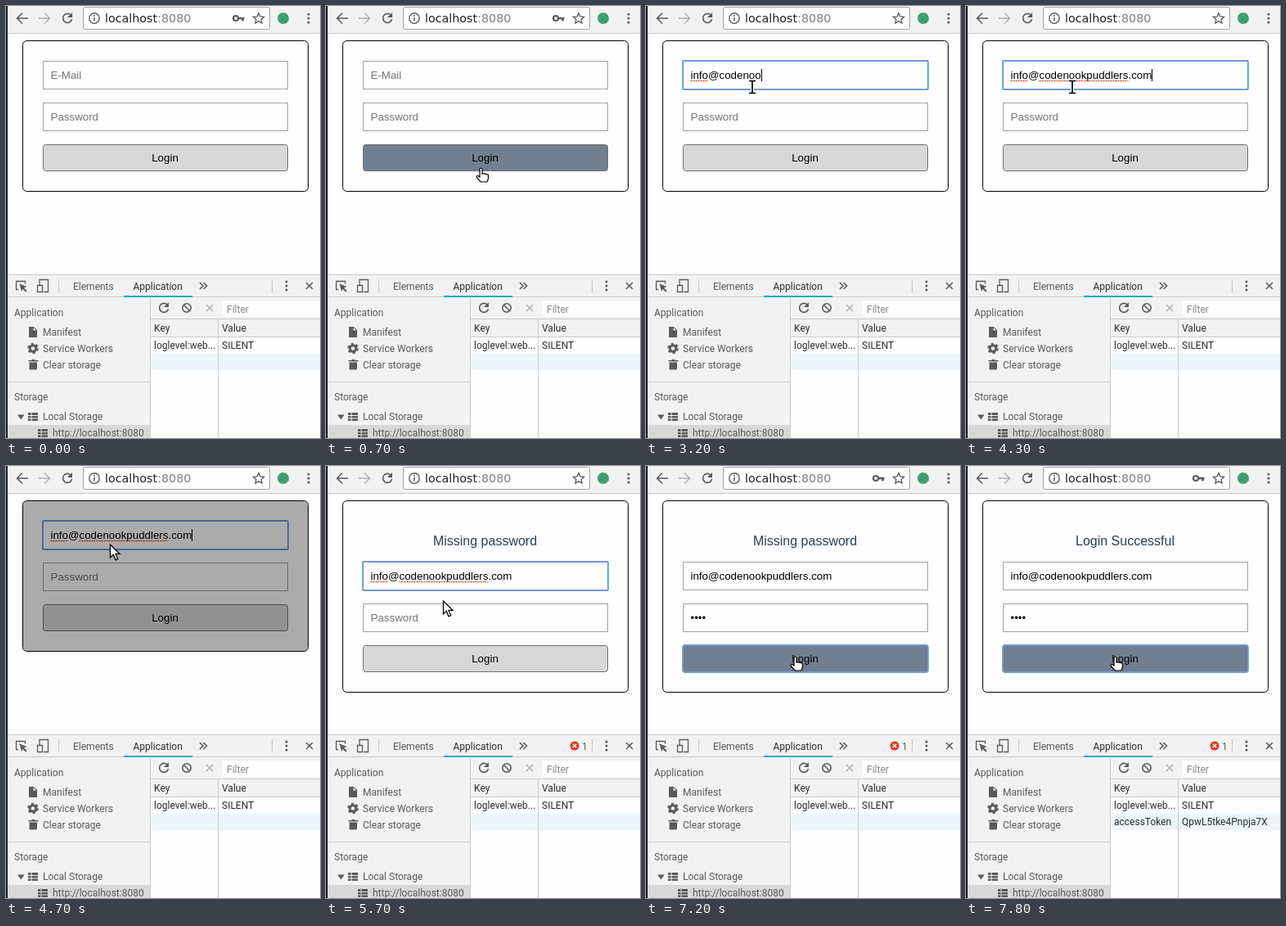
Recreate the animation shown at these times as an HTML page. Size 384 by 528 pixels, loop 8000 ms.

```html
<!DOCTYPE html>
<html lang="en">
<head>
<meta charset="utf-8">
<title>Login form demo</title>
<style>
html, body { margin: 0; width: 100%; height: 100%; overflow: hidden; background: #fefefe; }
svg { display: block; }
text { white-space: pre; font: 12px Roboto, sans-serif; fill: #585858; }
.form text { font: 13.333px "Liberation Sans", Arial, sans-serif; fill: #000; }
.form .hint { fill: #757575; }
.form #message { font-size: 16px; fill: #2c3e50; }
.mid { text-anchor: middle; }
.url { font: 14.3px "DejaVu Sans", sans-serif; fill: #222; }
.dark { fill: #2c2c2c; }
.line { fill: none; stroke: #5a5a5a; stroke-width: 1.6; }
.pale { stroke: #b4b4b4; }
.rule { fill: none; stroke: #cacaca; }
.solid { fill: #5a5a5a; }
.bar { fill: #f2f2f2; }
.field { fill: #fefefe; stroke: #a2a2a6; }
.squiggle { stroke: #cf5a32; stroke-width: 1.4; stroke-dasharray: 2 1; }
</style>
</head>
<body>
<svg width="384" height="528" viewBox="0 0 384 528">
  <defs>
    <g id="table" class="solid">
      <path d="M-6-5h3.500v3h-3.500zm4.500 0h7.500v3h-7.500zM-6-1h3.500v2.500h-3.500zm4.500 0h7.500v2.500h-7.500zM-6 2.500h3.500v2.500h-3.500zm4.500 0h7.500v2.500h-7.500z"/>
    </g>
    <g id="reload" class="line">
      <path d="M4-4A5.500 5.500 0 1 0 5.500 1"/>
      <path class="solid" stroke="none" d="M6-7v6h-6z"/>
    </g>
    <g id="dots" class="solid"><circle cy="-5" r="1.500"/><circle r="1.500"/><circle cy="5" r="1.500"/></g>
    <path id="cross" d="M-4-4L4 4M4-4L-4 4"/>
  </defs>

  <!-- browser toolbar -->
  <rect class="bar" width="384" height="33"/>
  <path class="rule" d="M0 33.500H384"/>
  <g class="line" stroke-width="2">
    <path d="M27 15H14M20 8.500L13.500 15L20 21.500"/>
    <path class="pale" d="M40 15H53M47 8.500L53.500 15L47 21.500"/>
  </g>
  <use href="#reload" x="75" y="15"/>
  <rect class="field" x="94.500" y="1.500" width="228" height="27" rx="2"/>
  <circle class="line" cx="108" cy="15" r="6.200" style="stroke-width:1.400"/>
  <path class="line" d="M108 11v2M108 14v4.500"/>
  <text class="url" x="121" y="20">localhost<tspan fill="#808080">:8080</tspan></text>
  <g id="key">
    <circle class="line" cx="281" cy="15" r="3" style="stroke-width:2.200"/>
    <path class="line" d="M284 15H291.500M289.500 15v3.500" style="stroke-width:2.400"/>
  </g>
  <path class="line" style="stroke-width:1.300" d="M309 8.500l1.900 4.300 4.700 .5-3.500 3.100 1 4.600-4.100-2.400-4.100 2.400 1-4.600-3.500-3.100 4.700-.5z"/>
  <circle cx="339" cy="15" r="7" fill="#3f9f74"/>
  <use href="#dots" x="370" y="15"/>

  <!-- login form -->
  <g class="form">
    <rect id="box" x="20.500" y="42.500" width="349" height="184" rx="5" fill="#fefefe" stroke="#000"/>
    <text id="message" class="mid" x="194.500" y="97"></text>
    <g id="rows">
      <rect class="field" x="45.500" y="67.500" width="299" height="34"/>
      <rect class="field" x="45.500" y="118.500" width="299" height="34"/>
      <rect id="button" x="45.500" y="169.500" width="299" height="32" rx="3" stroke="#707070"/>
      <rect id="ring" x="45" y="67" width="300" height="35" rx="1" fill="none" stroke="#7399d2" stroke-width="1.800"/>
      <text id="email" x="54.500" y="89"></text>
      <g id="marks" class="squiggle"><path/><path/></g>
      <text id="password" x="54.500" y="140"></text>
      <text class="mid" x="194.500" y="190">Login</text>
      <rect id="caret" width="1" height="15"/>
    </g>
    <rect id="veil" x="21" y="43" width="348" height="183" rx="4.500" fill-opacity=".33"/>
  </g>

  <!-- developer tools -->
  <rect class="bar" y="328" width="384" height="28"/>
  <path class="rule" d="M0 328.500H384M0 355.500H384M64.500 334v16M325.500 334v16"/>
  <g class="line" style="stroke-width:1.300">
    <path d="M15 346.500h-2.500v-10h11v3"/>
    <path class="solid" stroke="none" d="M16.500 339.500l9 3.500-3.500 1.500 3.500 3.500-1.500 1.500-3.500-3.500-1.500 3z"/>
    <path d="M41 341v-6.500h10.500v15H46M38.500 341.500h6v8h-6z"/>
  </g>
  <text x="82" y="347">Elements</text>
  <text class="dark" x="155.500" y="347">Application</text>
  <rect x="144" y="354" width="84" height="2" fill="#18a8c4"/>
  <path class="line" d="M237 338l4 4-4 4M241.500 338l4 4-4 4"/>
  <g id="error">
    <circle cx="304" cy="342" r="5.500" fill="#db3a28"/>
    <use href="#cross" transform="translate(304 342) scale(.55)" stroke="#fff" stroke-width="2.400"/>
    <text x="313" y="347">1</text>
  </g>
  <use href="#dots" x="343" y="342"/>
  <use href="#cross" class="line" x="371" y="342"/>

  <rect class="bar" y="356" width="176" height="172"/>
  <rect x="2" y="512" width="174" height="16" fill="#d8d8d8"/>
  <path class="rule" d="M0 459.500H176M176.500 356V528"/>
  <text x="10" y="379">Application</text>
  <path class="solid" d="M28 392h6l4 4v9h-10z"/>
  <path fill="#f2f2f2" d="M33.500 393v3.500h3.500z"/>
  <text x="45" y="403">Manifest</text>
  <circle class="line" cx="33" cy="418.500" r="3.800" style="stroke-width:3"/>
  <circle class="line" cx="33" cy="418.500" r="5.700" style="stroke-width:2.200" stroke-dasharray="3 2.970"/>
  <text x="45" y="423">Service Workers</text>
  <path class="solid" d="M27.500 433h3.500l1-1h3l1 1h3.500v1.500h-12zM28.500 435.500h9.500v7.500q0 1.500-1.500 1.500h-6.500q-1.500 0-1.500-1.500z"/>
  <text x="45" y="443">Clear storage</text>
  <text x="10" y="482">Storage</text>
  <path class="solid" d="M14 499.500h8.500l-4.200 6z"/>
  <use href="#table" x="33" y="502"/>
  <text x="45" y="506">Local Storage</text>
  <use href="#table" x="45" y="522"/>
  <text x="57" y="526">http://localhost:8080</text>

  <rect class="bar" x="177" y="356" width="207" height="48"/>
  <rect x="264" y="360" width="120" height="20" fill="#fefefe"/>
  <rect x="177" y="425" width="207" height="20" fill="#ecf5fb"/>
  <path class="rule" d="M177 382.500H384M177 404.500H384M259.500 383V528"/>
  <use href="#reload" x="193" y="369"/>
  <g class="line"><circle cx="221" cy="369" r="5.200"/><path d="M217.500 365.500l7 7"/></g>
  <use href="#cross" class="line pale" x="249" y="369"/>
  <text x="270" y="374.500" style="fill:#868686">Filter</text>
  <text class="dark" x="181" y="398">Key</text><text class="dark" x="264" y="398">Value</text>
  <text class="dark" x="181" y="419">loglevel:web...</text><text class="dark" x="264" y="419">SILENT</text>
  <g id="token">
    <text class="dark" x="181" y="439">accessToken</text><text class="dark" x="264" y="439">QpwL5tke4Pnpja7X</text>
  </g>
  <rect width="2" height="528" fill="#1c1c1c"/>

  <!-- mouse cursors, hot spot at the origin -->
  <g id="mouse" stroke="#000" fill="#fefefe">
    <path id="arrow" stroke-width="1.300" d="M.5 0v16l3.800-3.600 2.700 6.400 2.700-1.200-2.700-6.200h5z"/>
    <g id="beam" fill="none">
      <path stroke="#fff" stroke-width="4" d="M-4-7.500h8M0-7.500v15M-4 7.500h8"/>
      <path stroke-width="1.700" d="M-4-7.500h3l1 1 1-1h3M0-7v14M-4 7.500h3l1-1 1 1h3"/>
    </g>
    <path id="hand" stroke-width="1.200" d="M-3-1q0-2 1.500-2t1.500 2v5q1.500-1 3 .3 1.500-.8 2.500 .6 2-.6 2 1.600v3.500l-1.500 4h-8l-5-6q0-2 2-1.500l2 1.500z"/>
  </g>
</svg>
<script>
const $ = id => document.getElementById(id);
const LOOP = 8000, LEFT = 54.5;
const EMAIL = "info@codenookpuddlers.com";
const emailKeys = [1400, 1600, 1700, 1900, 2100, 2200, 2300, 2500, 2700, 2800, 3000, 3200, 3300,
  3400, 3500, 3600, 3700, 3800, 3800, 3900, 3900, 4000, 4100, 4100, 4200];
const passwordKeys = [6300, 6400, 6600, 6700];
const caretResets = [1100, 4300, 5000, 6000, ...emailKeys, ...passwordKeys];
const mousePath = [[300, 330, 400], [600, 215, 245], [900, 142, 112], [1100, 134, 101], [1200, 130, 99],
  [4300, 130, 99], [4400, 127, 96], [5400, 127, 96], [5700, 143, 165], [6000, 152, 184],
  [6700, 152, 184], [7000, 184, 236]];

const pen = document.createElement("canvas").getContext("2d");
pen.font = '13.333px "Liberation Sans", Arial, sans-serif';
const width = text => pen.measureText(text).width;
const typed = (keys, t) => keys.filter(k => k <= t).length;
const between = (t, a, b) => t >= a && t < b;
const show = (id, on) => $(id).setAttribute("display", on ? "inline" : "none");
const set = (id, attrs) => {
  for (const name in attrs) $(id).setAttribute(name, attrs[name]);
};

function mouseAt(t) {
  const i = mousePath.findIndex(p => p[0] > t);
  if (i < 1) return mousePath.at(i).slice(1);
  const [t0, x0, y0] = mousePath[i - 1], [t1, x1, y1] = mousePath[i];
  const k = (t - t0) / (t1 - t0);
  return [x0 + (x1 - x0) * k, y0 + (y1 - y0) * k];
}

function fill(id, text, hint) {
  $(id).textContent = text || hint;
  $(id).setAttribute("class", text ? "" : "hint");
}

function underline(path, from, to) {
  path.setAttribute("d", `M${LEFT + width(EMAIL.slice(0, from))} 91.500H${LEFT + width(EMAIL.slice(0, to))}`);
}

function draw(t) {
  const busy = between(t, 4400, 5000) || between(t, 7300, 7800);
  const shift = t >= 5000 ? 50 : 0;
  const focus = t < 1100 ? -1 : t < 6000 ? 0 : t < 7100 ? 1 : 2;
  const email = EMAIL.slice(0, typed(emailKeys, t));
  const password = "•".repeat(typed(passwordKeys, t));

  $("message").textContent = t >= 7800 ? "Login Successful" : shift ? "Missing password" : "";
  set("rows", { transform: `translate(0 ${shift})` });
  set("box", { height: 184 + shift });
  set("veil", { height: 183 + shift });
  show("veil", busy);
  fill("email", email, "E-Mail");
  fill("password", password, "Password");

  // spelling marks appear once a word is finished
  const [first, second] = $("marks").children;
  underline(first, 0, email.length > 4 ? 4 : 0);
  underline(second, 5, email.length > 21 ? 21 : 5);
  show("marks", focus === 0);

  show("ring", focus >= 0);
  set("ring", { y: 67 + 51 * Math.max(focus, 0), height: focus === 2 ? 33 : 35, rx: focus === 2 ? 3 : 1 });
  const last = Math.max(...caretResets.filter(k => k <= t));
  show("caret", between(focus, 0, 2) && (t - last) % 1000 < 500);
  set("caret", { x: Math.round(LEFT + width(focus ? password : email)), y: focus ? 128 : 77 });

  const [x, y] = mouseAt(t);
  const row = y - shift;
  const inside = x > 45 && x < 345 && !busy;
  const onInput = inside && (between(row, 67, 102) || between(row, 118, 153));
  const onButton = inside && between(row, 169, 202);
  set("button", { fill: onButton ? "#708090" : "#d8d8d8" });
  set("mouse", { transform: `translate(${Math.round(x)} ${Math.round(y)})` });
  show("mouse", t >= 300);
  show("beam", onInput);
  show("hand", onButton);
  show("arrow", !onInput && !onButton);

  show("key", t < 1400 || t >= 6300);
  show("error", t >= 5000);
  show("token", t >= 7800);
}

const start = performance.now();
function tick() {
  const t = (performance.now() - start) % LOOP;
  draw(Math.floor(t / 100) * 100);
  requestAnimationFrame(tick);
}
tick();
</script>
</body>
</html>
```
